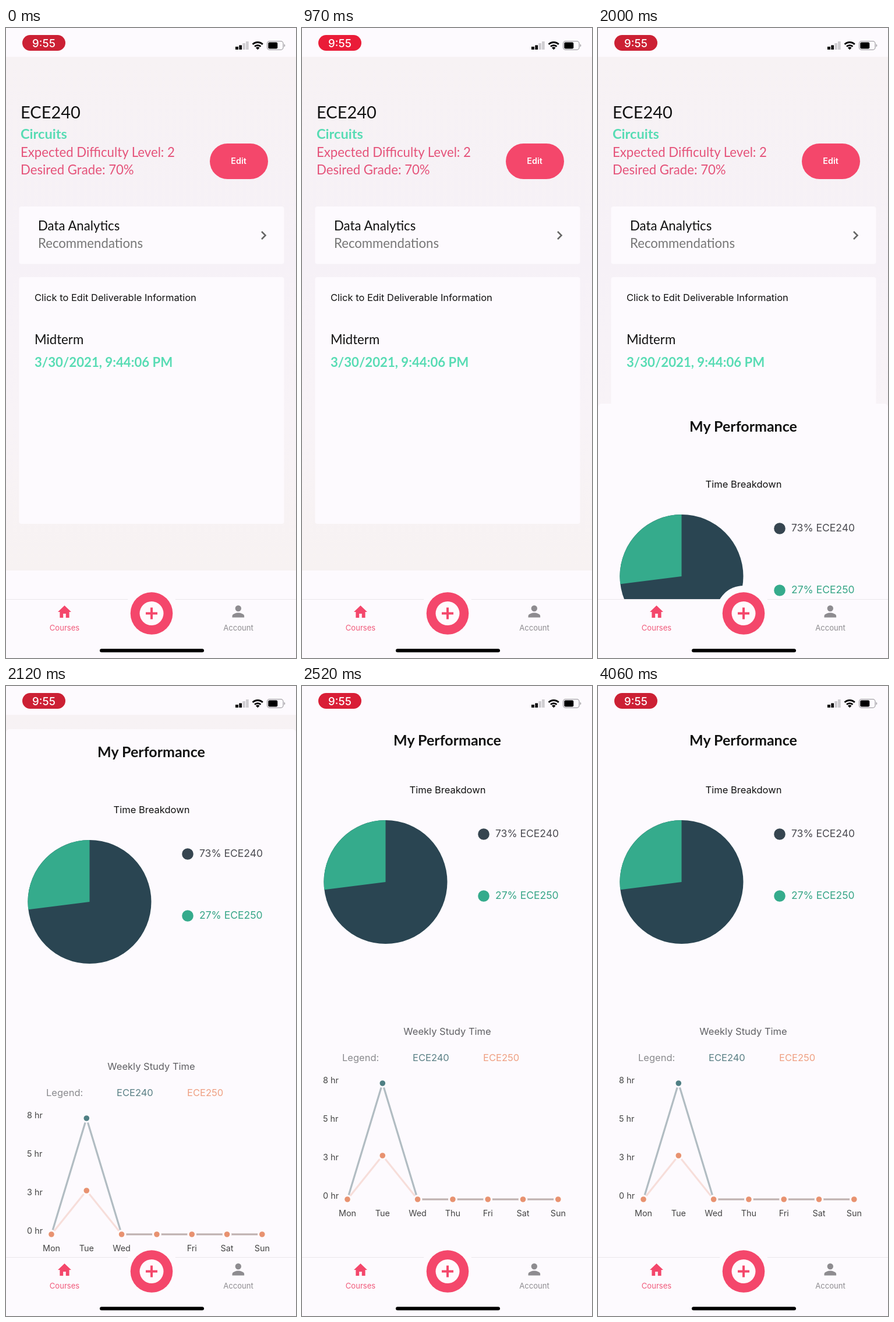
Recreate the animation shown at these times as an HTML page. Size 498 by 1080 pixels, loop 4.09 s.

```html
<!DOCTYPE html>
<html lang="en">
<head>
<meta charset="utf-8">
<title>Course performance</title>
<style>
  html, body { margin: 0; width: 100%; height: 100%; overflow: hidden; background: #fdfafe; }
  svg { display: block; width: 498px; height: 1080px; }
  text { font-family: Inter, "Noto Sans", sans-serif; font-size: 16.5px; fill: #111; }
  .round { font-family: Lato, "Open Sans", sans-serif; font-size: 22.2px; }
  .bold { font-weight: 700; }
  .mid { text-anchor: middle; }
  .teal { fill: #58dcb4; }
  .pink { fill: #e5537a; }
  .axis { font-size: 14.4px; fill: #444; }
  .share { font-size: 17.5px; }
  .tab { font-size: 13.1px; }
  .paper { fill: #fdfafe; }
  .rose { fill: #f4476b; }

  /* One loop lasts 4090 ms; the sheet rises in 30 ms steps from 1970 to 2180 ms. */
  .page, .sheet, .gap { animation: 4090ms step-end infinite; }
  .page { animation-name: leave; }
  .sheet { animation-name: rise; }
  .gap { animation-name: tighten; }
  .pill { animation: pulse 1022.5ms ease-in-out infinite alternate; }

  @keyframes pulse { from { fill: #cc2034; } to { fill: #ea1c38; } }
  @keyframes rise {
    0% { transform: translateY(1026px); }
    48.1% { transform: translateY(900px); }
    48.85% { transform: translateY(590px); }
    49.6% { transform: translateY(290px); }
    50.3% { transform: translateY(125px); }
    51.05% { transform: translateY(50px); }
    51.8% { transform: translateY(20px); }
    53.25%, 100% { transform: none; }
  }
  @keyframes tighten {
    0% { transform: translateY(var(--gap)); }
    53.25%, 100% { transform: none; }
  }
  @keyframes leave {
    0% { visibility: visible; }
    53.25%, 100% { visibility: hidden; }
  }
</style>
</head>
<body>
<svg viewBox="0 0 498 1080">
  <defs>
    <linearGradient id="backdrop" x2="0" y2="1">
      <stop offset="0" stop-color="#f7f2f4"/>
      <stop offset=".4" stop-color="#f6f1f7"/>
      <stop offset=".7" stop-color="#f8f3f7"/>
      <stop offset="1" stop-color="#f7f2f2"/>
    </linearGradient>
  </defs>
  <rect class="paper" width="498" height="1080"/>

  <g class="page">
    <rect y="49" width="498" height="881" fill="url(#backdrop)"/>
    <text class="round" x="25" y="154.5" style="font-size:29px">ECE240</text>
    <text class="round bold teal" x="25" y="189.5" style="font-size:23.6px">Circuits</text>
    <text class="round pink" x="25" y="220.5">Expected Difficulty Level: 2</text>
    <text class="round pink" x="25" y="250.5">Desired Grade: 70%</text>
    <rect class="rose" x="350" y="198" width="100" height="61" rx="30.5"/>
    <text class="mid" x="399.5" y="233" style="font-size:14.3px;font-weight:600;fill:#fff">Edit</text>

    <rect class="paper" x="22.5" y="306" width="455" height="98.5" rx="4"/>
    <text class="round" x="55" y="347">Data Analytics</text>
    <text class="round" x="55" y="377" style="fill:#777">Recommendations</text>
    <path d="M439 349l6.5 6.5-6.5 6.5" fill="none" stroke="#666" stroke-width="2.6"/>

    <rect class="paper" x="22.5" y="427" width="455" height="423" rx="4"/>
    <text x="49" y="468">Click to Edit Deliverable Information</text>
    <text class="round" x="49" y="542">Midterm</text>
    <text class="round bold teal" x="49" y="581">3/30/2021, 9:44:06 PM</text>
  </g>

  <g class="sheet">
    <rect class="paper" y="54" width="498" height="1080" rx="6"/>
    <text class="round bold mid" x="249.5" y="102" style="font-size:25px">My Performance</text>
    <g class="gap" style="--gap:14px">
      <text class="mid" x="250" y="184">Time Breakdown</text>
      <circle cx="143.5" cy="336" r="106" fill="#2a4552"/>
      <path d="M143.5 336L38.3 349.3A106 106 0 0 1 143.5 230Z" fill="#35ab8c"/>
      <circle cx="312" cy="254" r="9.8" fill="#364550"/>
      <text class="share" x="332" y="259" style="fill:#4a4a50">73% ECE240</text>
      <circle cx="312" cy="360" r="9.8" fill="#35ab8c"/>
      <text class="share" x="332" y="365" style="fill:#35a586">27% ECE250</text>
    </g>
    <g class="gap" style="--gap:40px" id="weekly">
      <text class="mid" x="249.5" y="598" style="fill:#5f5f63">Weekly Study Time</text>
      <text x="69" y="643" style="fill:#8a8a8e">Legend:</text>
      <text x="190" y="643" style="fill:#5b8086">ECE240</text>
      <text x="311" y="643" style="fill:#efa083">ECE250</text>
    </g>
  </g>

  <g id="status">
    <rect class="paper" width="498" height="49.5"/>
    <rect class="pill" x="28" y="12" width="74" height="27" rx="13.5"/>
    <text class="mid" x="65" y="32.5" style="font-size:18.6px;font-weight:500;fill:#fff">9:55</text>
    <path d="M394 32h5v5h-5zM400.3 29.5h4.7v7.5h-4.7z"/>
    <path d="M406.3 26h4.7v11h-4.7zM412 23h4.7v14h-4.7z" fill="#cfcdd1"/>
    <g fill="none" stroke="#000" stroke-width="2.9">
      <path d="M423.6 28a12.2 12.2 0 0 1 17.2 0M427 31.8a7.4 7.4 0 0 1 10.4 0"/>
    </g>
    <path d="M432.2 37.2l-3.2-3.3a4.5 4.5 0 0 1 6.4 0z"/>
    <rect x="448.5" y="22.7" width="27.5" height="14.6" rx="4" fill="none" stroke="#a5a3a7" stroke-width="1.3"/>
    <rect x="450.3" y="24.5" width="16" height="11" rx="2.2"/>
    <path d="M477.5 27.5a2.6 2.6 0 0 1 0 5z" fill="#a5a3a7"/>
  </g>

  <g id="tabs">
    <rect class="paper" y="979" width="498" height="101"/>
    <path d="M0 979.5H498" stroke="#e9e6ea"/>
    <circle class="paper" cx="250" cy="1003.5" r="47.5"/>
    <circle class="rose" cx="250" cy="1003.5" r="36.3"/>
    <circle cx="250" cy="1003.5" r="20.5" fill="#fffafd"/>
    <path d="M240 1003.5h20M250 993.5v20" stroke="#f4476b" stroke-width="4"/>
    <path class="rose" d="M100.5 990L112 1001h-3.4v10h-5.8v-7h-4.6v7h-5.8v-10H89z"/>
    <text class="tab mid" x="100.5" y="1033" style="fill:#f0597a">Courses</text>
    <g fill="#8e8c90">
      <circle cx="398.8" cy="995" r="5.2"/>
      <path d="M388.5 1010.5v-2.6c0-3.5 6.8-5.4 10.3-5.4s10.3 1.9 10.3 5.4v2.6z"/>
    </g>
    <text class="tab mid" x="399" y="1033" style="fill:#8e8c90">Account</text>
    <rect x="161" y="1064.3" width="179" height="6" rx="3"/>
  </g>
</svg>
<script>
  const weekly = document.getElementById('weekly');
  const days = ['Mon', 'Tue', 'Wed', 'Thu', 'Fri', 'Sat', 'Sun'];
  const baseY = 880;
  const dayX = i => 78 + 60.3 * i;

  function add(tag, attrs, label = '') {
    const el = document.createElementNS('http://www.w3.org/2000/svg', tag);
    for (const key in attrs) el.setAttribute(key, attrs[key]);
    el.textContent = label;
    weekly.append(el);
  }

  // Studying happened only on Tuesday, so each series needs a single peak.
  function series(peakY, line, dot) {
    const points = days.map((_, i) => [dayX(i), i === 1 ? peakY : baseY]);
    add('polyline', { points: points.join(' '), fill: 'none', stroke: line, 'stroke-width': 3.2 });
    for (const [cx, cy] of points) {
      add('circle', { cx, cy, r: 6.3, fill: dot, stroke: '#fdfafe', 'stroke-width': 3 });
    }
  }

  ['8 hr', '5 hr', '3 hr', '0 hr'].forEach((label, i) =>
    add('text', { x: 36, y: 681 + 66.1 * i, class: 'axis' }, label));
  days.forEach((label, i) =>
    add('text', { x: dayX(i), y: 908.5, class: 'axis mid' }, label));
  series(681, 'rgba(72, 102, 112, .42)', '#4f7f84');
  series(805, 'rgba(232, 145, 115, .26)', '#e89270');
</script>
</body>
</html>
```
